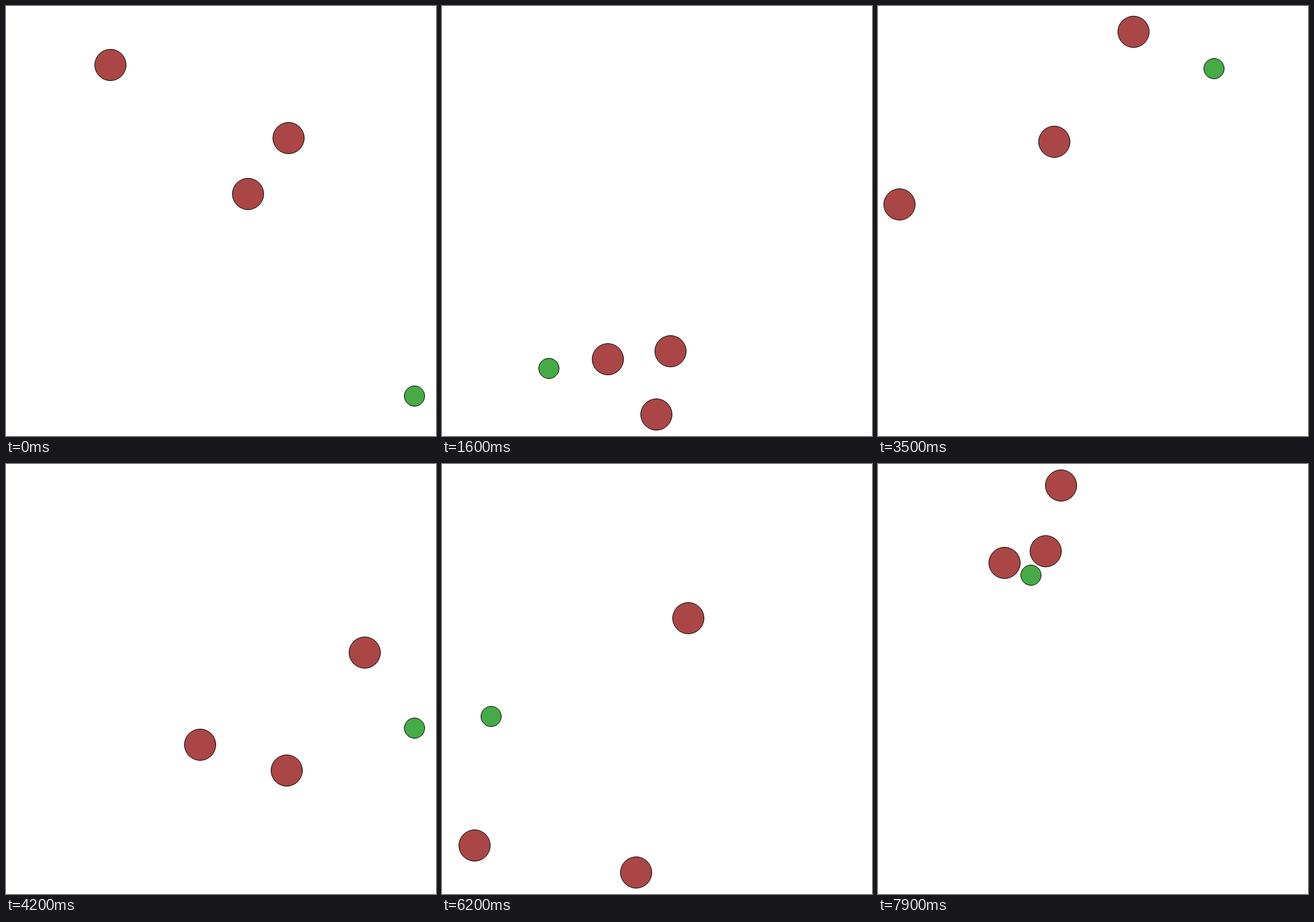
Write an HTML page with a canvas that moves like this. It is 700 px wide and 700 px high and loops after 8000 ms.

```html
<!DOCTYPE html>
<html lang="en">
<head>
<meta charset="utf-8">
<title>Pursuit</title>
<style>
  html, body { margin: 0; width: 100%; height: 100%; overflow: hidden; background: #fff; }
  canvas { display: block; }
</style>
</head>
<body>
<canvas id="stage" width="700" height="700"></canvas>
<script>
const ctx = document.getElementById('stage').getContext('2d');
const LOOP = 8000, STEP = 100, MID = 350, REACH = 315;

// Each key: step, then x, y of three chasers and the runner.
const chase = [
  [0, 170, 96, 460, 215, 394, 306, 665, 635],
  [9, 380, 325, 547, 480, 450, 520, 556, 665],
  [16, 372, 562, 349, 665, 270, 575, 174, 590],
  [18, 267, 520, 255, 614, 175, 530, 35, 500],
  [27, 161, 173, 144, 196, 35, 299, 121, 59],
  [36, 440, 35, 300, 230, 36, 329, 584, 110],
  [42, 584, 307, 457, 499, 316, 457, 665, 430],
  [50, 642, 532, 512, 581, 489, 579, 539, 665],
  [54, 598, 430, 500, 665, 430, 590, 389, 640],
  [62, 401, 251, 316, 665, 53, 621, 80, 411]
];
const finish = [
  [63, 350, 192, 290, 549, 62, 540, 35, 350],
  [72, 220, 110, 190, 192, 110, 175, 79, 35],
  [79, 298, 35, 273, 142, 206, 161, 249, 181]
];

function slope(keys, i, c) {
  const a = keys[Math.max(i - 1, 0)], b = keys[Math.min(i + 1, keys.length - 1)];
  return 0.6 * (b[c] - a[c]) / (b[0] - a[0]);
}

function positions(step) {
  const keys = step < finish[0][0] ? chase : finish;
  let i = 0;
  while (i < keys.length - 2 && step >= keys[i + 1][0]) i++;
  const a = keys[i], b = keys[i + 1], span = b[0] - a[0];
  const u = (step - a[0]) / span, v = 1 - u;
  return a.slice(1).map((p, k) => {
    const c = k + 1;
    return v * v * (1 + 2 * u) * p + u * u * (3 - 2 * u) * b[c]
      + span * u * v * (v * slope(keys, i, c) - u * slope(keys, i + 1, c)) - MID;
  });
}

function disc(x, y, r, fill) {
  ctx.beginPath();
  ctx.arc(x, y, r, 0, Math.PI * 2);
  ctx.fillStyle = fill;
  ctx.fill();
  ctx.stroke();
}

function draw(step) {
  const pos = positions(step);
  // The camera always fits the outermost disc.
  const zoom = REACH / Math.max(...pos.map(Math.abs));
  const at = k => Math.round(MID + pos[k] * zoom);
  ctx.fillStyle = '#fff';
  ctx.fillRect(0, 0, 700, 700);
  ctx.strokeStyle = '#000';
  ctx.lineWidth = 1;
  for (let k = 0; k < 6; k += 2) disc(at(k), at(k + 1), 25.5, '#aa4646');
  disc(at(6), at(7), 16.5, '#46aa46');
}

const start = performance.now();
function tick() {
  draw(Math.floor((performance.now() - start) % LOOP / STEP));
  requestAnimationFrame(tick);
}
tick();
</script>
</body>
</html>
```
